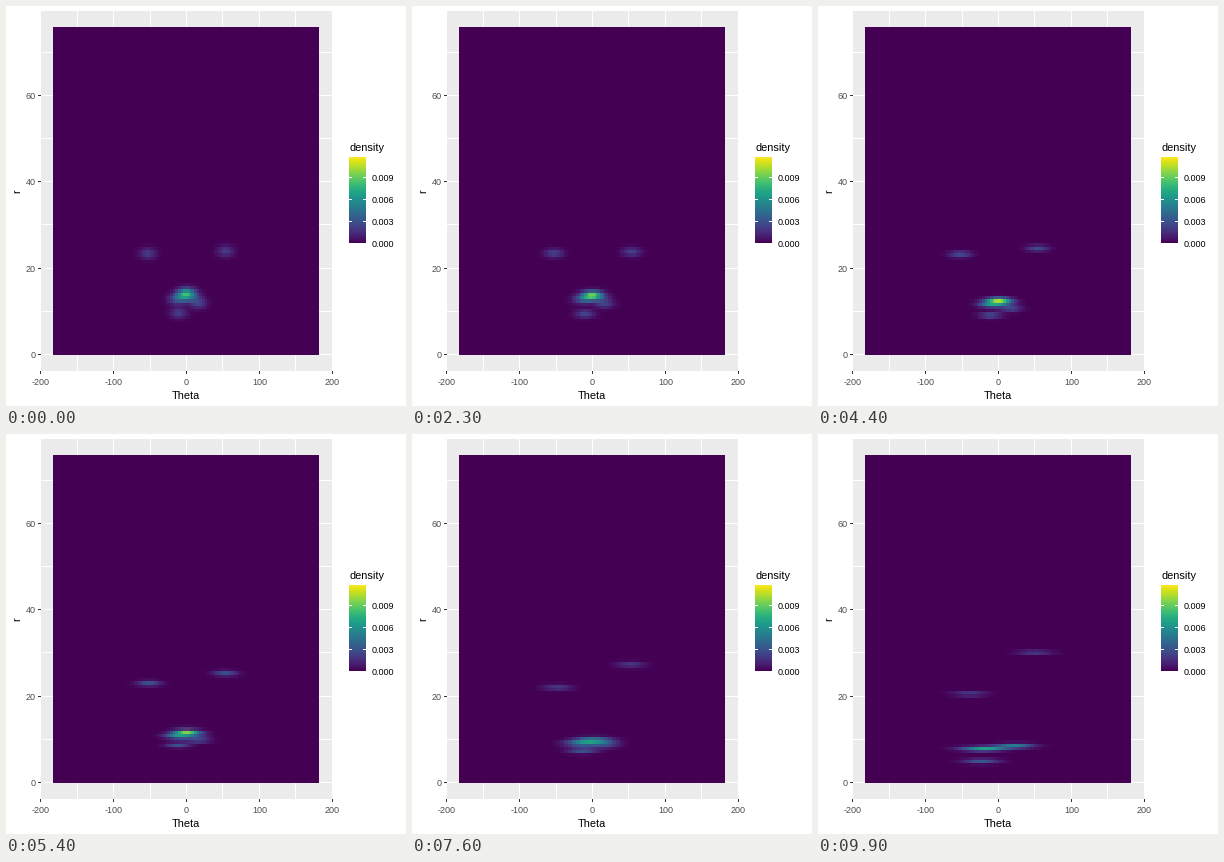
Write a matplotlib script that moves like this. It is 400 by 400 pixels and loops after 10000 ms.

```python
import numpy as np
import matplotlib.pyplot as plt
from matplotlib.animation import FuncAnimation
from matplotlib.patches import Rectangle

plt.rcParams["font.family"] = "Liberation Sans"

STATES, STEPS = 10, 11
LAST = STATES - 1
TOP = 0.0117
UNIT = 0.09
CMAP = plt.get_cmap("viridis")

# weight, theta at start and end, r at four even times (joined by a cubic)
TRACKS = [
    (1, -52, -38, 23.1, 23.1, 22.2, 20.2),
    (1, 54, 50, 23.6, 23.7, 25.9, 29.8),
    (1, -10, -23, 9.3, 9, 7.8, 4.6),
    (1, 17, 16, 11.5, 11, 8.8, 8.1),
    (1, -14, -38, 12.5, 12, 9.6, 7.6),
    (2, 0, -11, 13.9, 13, 10.4, 7.6),
    (1, 5, 30, 13.7, 12.9, 10.3, 8.2),
    (1, -6, -22, 13.2, 12.6, 9.7, 7.3),
    (0.6, 12, 22, 12.8, 12.5, 9.9, 8.3),
    (0.6, -3, -22, 13, 12.3, 8.5, 4.8),
]

theta = np.linspace(-180, 180, 100)
r = np.linspace(0, 75, 100)


def bell(x, mid, sd):
    return np.exp(-0.5 * ((x - mid) / sd) ** 2)


def density(k):
    u = k / LAST
    sd_t = 7.9 + 0.4 * k + 0.062 * k * k
    sd_r = np.interp(k, [0, 3, 5, 6, 9], [0.88, 0.6, 0.41, 0.48, 0.4])
    total = np.zeros((r.size, theta.size))
    for w, start, end, *heights in TRACKS:
        mid_t = start + (end - start) * u ** 4
        mid_r = np.polyval(np.polyfit(np.linspace(0, 1, 4), heights, 3), u)
        total += w * np.outer(bell(r, mid_r, sd_r), bell(theta, mid_t, sd_t))
    return total * UNIT / (2 * np.pi * sd_t * sd_r)


maps = [CMAP(np.clip(density(k) / TOP, 0, 1))[..., :3] for k in range(STATES)]


def colours(i):
    k, step = divmod(i, STEPS)
    mix = step / STEPS
    return maps[k] * (1 - mix) + maps[min(k + 1, LAST)] * mix


fig = plt.figure(figsize=(4, 4), dpi=100, facecolor="white")
ax = fig.add_axes([0, 0, 1, 1])
ax.axis("off")


def box(x, y, w, h, color, z=2):
    ax.add_patch(Rectangle((x, y), w, h, color=color, lw=0, antialiased=False, zorder=z))


def label(x, y, s, px, color="black", ha="center", va="baseline", **kw):
    ax.text(x, y, s, fontsize=px * 0.72, color=color, ha=ha, va=va, **kw)


def raster(data, left, right, bottom, top):
    return ax.imshow(data, cmap=CMAP, extent=(left, right, bottom, top), origin="lower",
                     aspect="auto", interpolation="nearest", zorder=3)


def px_x(t):
    return round(180 + 0.729 * t)


def px_y(v):
    return round(347.9 - 4.316 * v)


# Panel and grid
box(35, 5, 291, 360, "#EBEBEB", 1)
for t in range(-150, 200, 50):
    box(px_x(t), 5, 1, 360, "white")
for v in range(0, 80, 10):
    box(35, px_y(v), 291, 1, "white")

# Axes
for t in range(-200, 201, 100):
    box(px_x(t), 365, 1, 3, "#333333")
    label(px_x(t) + 0.5, 379, str(t), 9, "#4D4D4D")
for v in range(0, 61, 20):
    box(32, px_y(v), 3, 1, "#333333")
    label(29.5, px_y(v) + 4, str(v), 9, "#4D4D4D", "right")
label(180, 393, "Theta", 11)
label(11.5, 185.5, "r", 11, rotation=90, va="center")

# Colour bar
label(343, 145, "density", 11, ha="left")
raster(np.linspace(0, 1, 256)[:, None], 343, 360, 237, 151)
for n in range(4):
    y = 237 - 22 * n
    if n:
        box(343, y, 3, 1, "white", 4)
        box(357, y, 3, 1, "white", 4)
    label(366, y + 4, f"{n * 0.003:.3f}", 9, ha="left")

heat = raster(colours(0), 47, 313, 349, 21)
ax.set_xlim(0, 400)
ax.set_ylim(400, 0)


def update(i):
    heat.set_data(colours(i))
    return [heat]


anim = FuncAnimation(fig, update, frames=LAST * STEPS + 1, interval=100,
                     repeat=True, repeat_delay=0)
plt.show()
```
